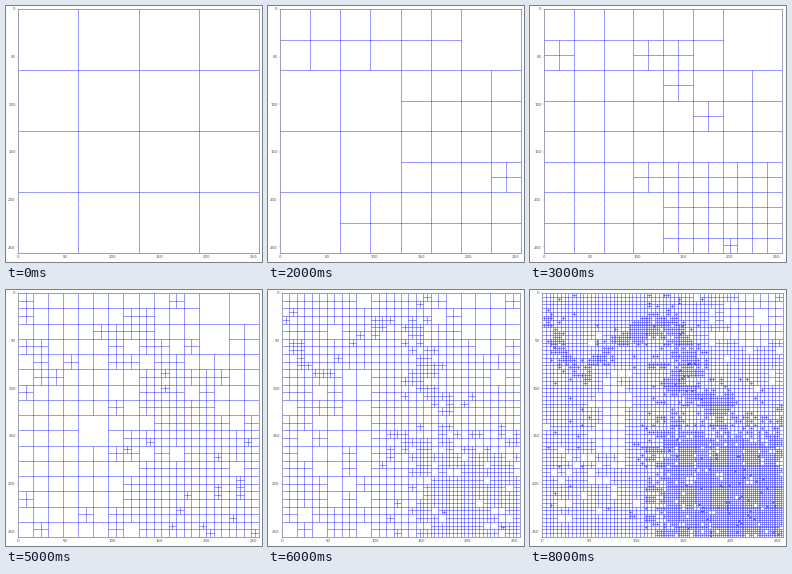
A matplotlib script for the animation above (9 s loop, 256 px wide and 256 px high).

```python
import numpy as np
import matplotlib.pyplot as plt
from matplotlib.animation import FuncAnimation
from matplotlib.collections import LineCollection

STAGE, DPI, SIZE = 256, 72, 256
STEPS, DEEPEST = 9, 7
N = 2 ** DEEPEST

# Winding line along which the detail is finest
RIDGE = np.array([(6, 25), (24, 76), (48, 84), (78, 52), (100, 40),
                  (138, 30), (162, 70), (142, 95), (195, 120)], float)

rng = np.random.default_rng(12)
noise = {k: rng.normal(0, .42, (2 ** k, 2 ** k)) for k in range(DEEPEST + 1)}


def hill(x, y, cx, cy, rx, ry):
    return np.exp(-((x - cx) / rx) ** 2 - ((y - cy) / ry) ** 2)


def ramp(v, start, width):
    return 1 / (1 + np.exp((start - v) / width))


def ridge_distance(x, y):
    best = np.full(x.shape, np.inf)
    for (ax0, ay0), (dx, dy) in zip(RIDGE, np.diff(RIDGE, axis=0)):
        t = ((x - ax0) * dx + (y - ay0) * dy) / (dx * dx + dy * dy)
        t = np.clip(t, 0, 1)
        best = np.minimum(best, np.hypot(x - ax0 - t * dx, y - ay0 - t * dy))
    return best


def detail_field():
    """Amount of detail at every smallest cell."""
    c = (np.arange(N) + .5) * SIZE / N
    x, y = np.meshgrid(c, c)
    d = .22 + .5 * np.exp(-(ridge_distance(x, y) / 11) ** 2)
    d += .55 * ramp(x, 112, 10) * ramp(y, 138, 14)
    d += .25 * hill(x, y, 142, 75, 40, 70)
    d += .2 * hill(x, y, 205, 215, 40, 45)
    d -= .9 * hill(x, y, 222, 25, 36, 30)
    d -= .8 * hill(x, y, 74, 130, 18, 48)
    d += np.kron(rng.normal(0, .1, (N // 4, N // 4)), np.ones((4, 4)))
    return np.minimum(d, .95)


field = detail_field()


def split_step(level, col, row):
    if level < 2:
        return 0
    k = N >> level
    d = field[row * k:(row + 1) * k, col * k:(col + 1) * k].mean()
    t = 6.2 - 2.6 * d + 1.65 * (level - 4) + noise[level][row, col]
    return max(1, int(np.ceil(t)))


def divide(level, col, row, start, out):
    """Collect the cross of every divided cell under the step it appears at."""
    step = max(start, split_step(level, col, row))
    if step >= STEPS:
        return
    s = SIZE / 2 ** level
    x, y = col * s, row * s
    out[step] += [[(x + s / 2, y), (x + s / 2, y + s)],
                  [(x, y + s / 2), (x + s, y + s / 2)]]
    if level < DEEPEST:
        for j in (0, 1):
            for i in (0, 1):
                divide(level + 1, 2 * col + i, 2 * row + j, step, out)


crosses = [[] for _ in range(STEPS)]
divide(0, 0, 0, 0, crosses)

fig = plt.figure(figsize=(STAGE / DPI, STAGE / DPI), dpi=DPI, facecolor="white")
ax = fig.add_axes([0, 0, 1, 1])
ax.set(xlim=(0, SIZE), ylim=(SIZE, 0))
ticks = range(0, 251, 50)
ax.set_xticks(ticks)
ax.set_yticks(ticks)
ax.tick_params(length=1, width=.4, labelsize=4, color="#888888",
               labelcolor="#555555", labelfontfamily="DejaVu Sans", pad=1.3)
for spine in ax.spines.values():
    spine.set(color="#7777a0", linewidth=.7)

grid = LineCollection([], colors=[(0, 0, 1, .5)], linewidths=.8)
grid.set_snap(True)
ax.add_collection(grid)


def place(left, right, top=3, bottom=247):
    ax.set_position([left / STAGE, 1 - bottom / STAGE,
                     (right - left) / STAGE, (bottom - top) / STAGE])


def update(n):
    # Every third step the plot is laid out a little narrower
    narrow = n > 0 and n % 3 == 0
    place(*((14, 252) if narrow else (12, 253)))
    grid.set_segments([s for part in crosses[:n + 1] for s in part])
    return grid,


anim = FuncAnimation(fig, update, frames=STEPS, interval=1000,
                     repeat=True, repeat_delay=0, blit=False)
plt.show()
```
